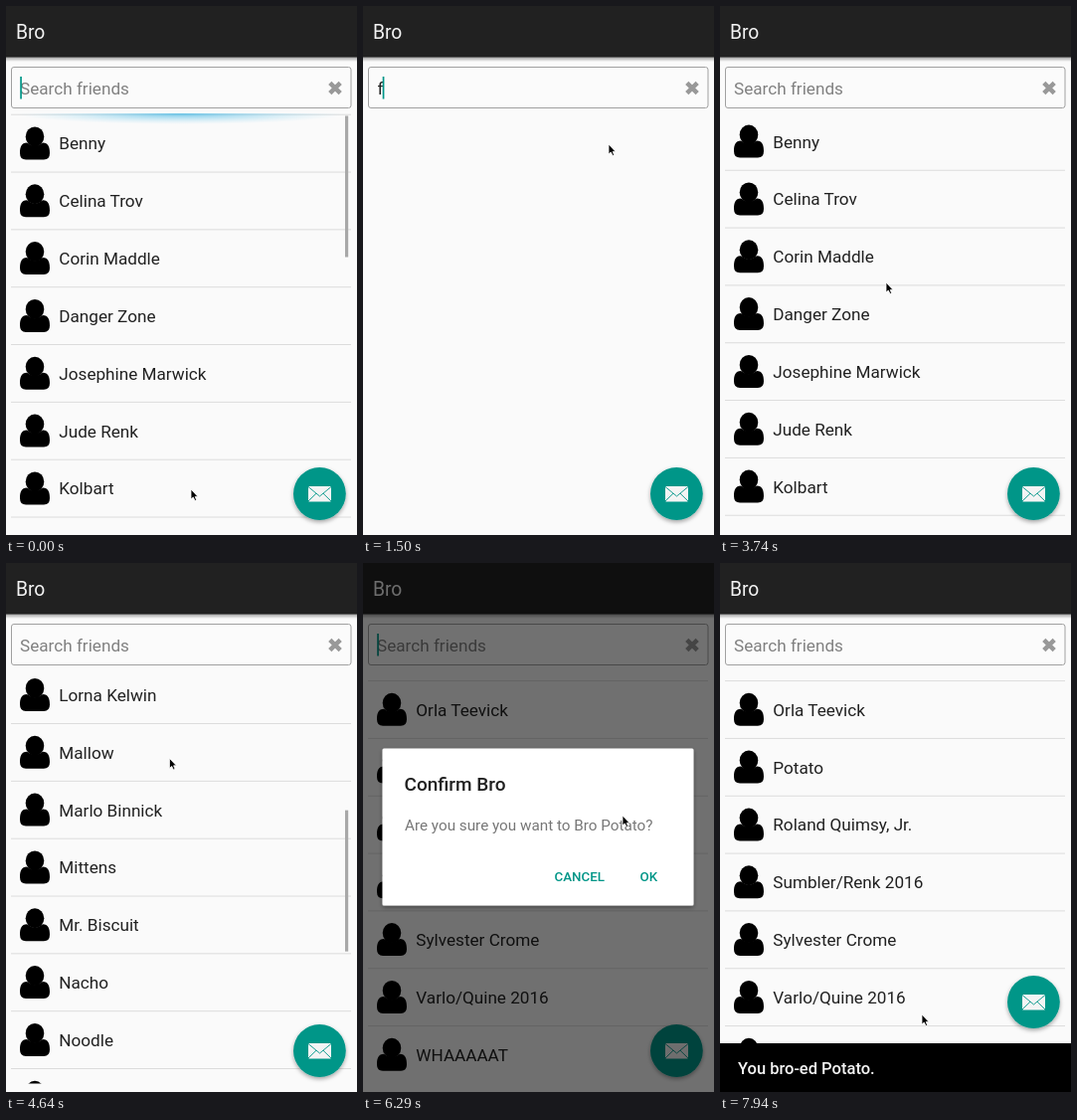
Write an HTML page that moves like this. It is 353x532 px and loops after 8 s.

```html
<!DOCTYPE html>
<html lang="en">
<head>
<meta charset="utf-8">
<title>Bro</title>
<style>
  html, body { margin: 0; height: 100%; overflow: hidden; background: #fafafa; }
  svg { display: block; width: 100vw; height: 100vh; font-family: Roboto, sans-serif; }
  .row text, .field { font-size: 17.15px; }
  .title { font-size: 19.3px; fill: #f2f2f2; }
  .heading { font-size: 19px; font-weight: 500; fill: #212121; }
  .button { font-size: 13.3px; font-weight: 500; fill: #009688; }
</style>
</head>
<body>
<svg viewBox="0 0 353 532">
  <defs>
    <clipPath id="listClip"><rect y="108" width="353" height="415.5"/></clipPath>
    <linearGradient id="barShadow" x2="0" y2="1">
      <stop stop-opacity=".38"/>
      <stop offset="1" stop-opacity="0"/>
    </linearGradient>
    <radialGradient id="glowFill">
      <stop stop-color="#45b8e4" stop-opacity=".8"/>
      <stop offset="1" stop-color="#a5dcf2" stop-opacity="0"/>
    </radialGradient>
    <filter id="shadow" x="-30%" y="-30%" width="160%" height="160%">
      <feDropShadow dx="0" dy="2" stdDeviation="2" flood-opacity=".35"/>
    </filter>
    <g id="person">
      <ellipse cx="29" cy="-6.5" rx="9.3" ry="10"/>
      <path d="M14 10C14 4 15.500-.5 21-.5Q29 6 37-.5C42.500-.5 44 4 44 10Q44 16.500 38 16.500H20Q14 16.500 14 10Z"/>
    </g>
  </defs>

  <rect width="353" height="532" fill="#fafafa"/>
  <g clip-path="url(#listClip)">
    <g id="list"></g>
    <ellipse id="glow" cx="176" cy="108" rx="166" ry="11" fill="url(#glowFill)"/>
    <rect id="thumb" x="341" y="110.5" width="3.2" height="142" fill="#a8a8a8"/>
  </g>

  <rect y="51" width="353" height="5" fill="url(#barShadow)"/>
  <rect width="353" height="51.5" fill="#212121"/>
  <text class="title" x="10" y="32.5">Bro</text>

  <rect x="5.5" y="61.5" width="341.5" height="41" rx="2.5" fill="#fbfbfb" stroke="#a0a0a0"/>
  <text id="hint" class="field" x="14" y="88.7" fill="#808080">Search friends</text>
  <text id="query" class="field" x="14.5" y="88.7" fill="#222">f</text>
  <rect id="caret" y="71" width="1.7" height="22.5" fill="#009688"/>
  <path d="M325.8 77.3l10.4 10.4m0-10.4l-10.4 10.4" stroke="#999" stroke-width="4.5"/>

  <g id="fab">
    <circle cx="315.4" cy="490.5" r="26.4" fill="#009688" filter="url(#shadow)"/>
    <rect x="304" y="483" width="23" height="15.5" rx="1" fill="#f4f4f4"/>
    <path d="M304 483.5l11.5 9.5l11.5-9.5M304 498l8-7.8M327 498l-8-7.8" fill="none" stroke="#009688" stroke-width=".9"/>
  </g>

  <g id="snack">
    <rect y="532" width="353" height="49" fill="#000"/>
    <text x="18" y="562.5" font-size="16.5" font-weight="500" fill="#f4f4f4">You bro-ed Potato.</text>
  </g>

  <rect id="dim" width="353" height="532"/>
  <g id="dialog">
    <rect x="19.5" y="186.5" width="313" height="158" rx="1.5" fill="#fff" filter="url(#shadow)"/>
    <rect id="press" x="258" y="297" width="60" height="34" rx="2" fill="#d6d6d6"/>
    <text class="heading" x="41.5" y="229">Confirm Bro</text>
    <text x="42" y="269" font-size="15.25" fill="#777">Are you sure you want to Bro Potato?</text>
    <text class="button" x="192.5" y="319.5">CANCEL</text>
    <text class="button" x="278.5" y="319.5">OK</text>
  </g>
  <path id="mouse" d="M0 0V10L2.300 8L4 11.500L5.600 10.800L4.200 7.400H7Z" stroke="#fff" stroke-width=".8"/>
</svg>

<script>
const LOOP = 8000, FRAME = 150, ROW = 57.83, LIST_TOP = 107.4;
const friends = ["Benny", "Celina Trov", "Corin Maddle", "Danger Zone", "Josephine Marwick",
  "Jude Renk", "Kolbart", "Lorna Kelwin", "Mallow", "Marlo Binnick", "Mittens", "Mr. Biscuit",
  "Nacho", "Noodle", "Orla Teevick", "Potato", "Roland Quimsy, Jr.", "Sumbler/Renk 2016",
  "Sylvester Crome", "Varlo/Quine 2016", "WHAAAAAT"];
const SCROLL_END = friends.length * ROW - 416;

const FLING = 825, flings = [3740, 3740 + FLING];
const filterToggles = [1050, 1200, 1500, 2100, 2540, 2690, 3140, 3440];
const CONFIRM = 5840, ACCEPT = 7190, SNACK = 7490;

// The pointer rests between these moves.
const moves = [
  { from: 150, to: 900, x: 247, y: 139 },
  { from: 3140, to: 3740, x: 167, y: 278 },
  { from: 3740, to: 5240, x: 163, y: 206 },
  { from: CONFIRM, to: 6290, x: 261, y: 254 },
  { from: 6290, to: 7040, x: 280, y: 310 },
  { from: SNACK, to: 7940, x: 203, y: 454 },
];

const el = id => document.getElementById(id);
const set = (id, name, value) => el(id).setAttribute(name, value);
const fade = (id, alpha) => set(id, "opacity", +alpha);
const shift = (id, x, y) => set(id, "transform", `translate(${x} ${y})`);

const ramp = (t, from, to) => Math.min(1, Math.max(0, (t - from) / (to - from)));
const pulse = (t, from, rise, to, fall) => ramp(t, from, from + rise) - ramp(t, to, to + fall);
const easeInOut = p => p * p * (3 - 2 * p);
const sumFlings = f => flings.reduce((sum, start) => sum + f(start), 0);

el("list").innerHTML = friends.map((name, i) =>
  `<g class="row" transform="translate(0 ${i * ROW})">
     <rect x="5" y="-.5" width="342" height="1" fill="#dcdcdc"/>
     <use href="#person" y="28.7"/>
     <text x="53.3" y="35.2" fill="#212121">${name}</text>
   </g>`).join("");

function pointerAt(t) {
  let x = 186, y = 486;
  for (const move of moves) {
    const p = easeInOut(ramp(t, move.from, move.to));
    x += (move.x - x) * p;
    y += (move.y - y) * p;
  }
  const swipe = sumFlings(start => Math.sin(Math.PI * ramp(t, start, start + FLING * .8)));
  return [x, y - 100 * swipe];
}

function draw(t) {
  const typed = filterToggles.filter(time => time <= t).length % 2 === 1;
  const scroll = SCROLL_END / flings.length *
    sumFlings(start => easeInOut(ramp(t, start, start + FLING)));
  const rise = 49 * ramp(t, SNACK, SNACK + 300);
  const blinkOff = t >= 3590 && (t - 3590) % 1000 < 500;
  const caretOn = !blinkOff || (t > CONFIRM + FRAME && t < SNACK);

  fade("list", !typed);
  shift("list", 0, LIST_TOP + (t < filterToggles[0] ? 1.8 : 0) - scroll);
  fade("glow", 1 - ramp(t, 0, 450));
  fade("thumb", 1 - ramp(t, 300, 600) + pulse(t, flings[0], FRAME, 5090, 300));
  shift("thumb", 0, scroll / SCROLL_END * 270);

  fade("hint", !typed);
  fade("query", typed);
  fade("caret", caretOn);
  set("caret", "x", typed ? 19.7 : 14.2);

  shift("fab", 0, -rise);
  shift("snack", 0, -rise);
  fade("dim", .55 * pulse(t, CONFIRM, 450, ACCEPT + 120, 300));
  fade("dialog", pulse(t, CONFIRM + FRAME, 300, ACCEPT, 300));
  fade("press", t > ACCEPT);
  shift("mouse", ...pointerAt(t));
}

function stepped(t) {
  const base = t < 2540 ? 0 : 2540;
  return base + Math.floor((t - base) / FRAME) * FRAME;
}

const start = performance.now();
function tick() {
  draw(stepped((performance.now() - start) % LOOP));
  requestAnimationFrame(tick);
}
tick();
</script>
</body>
</html>
```
